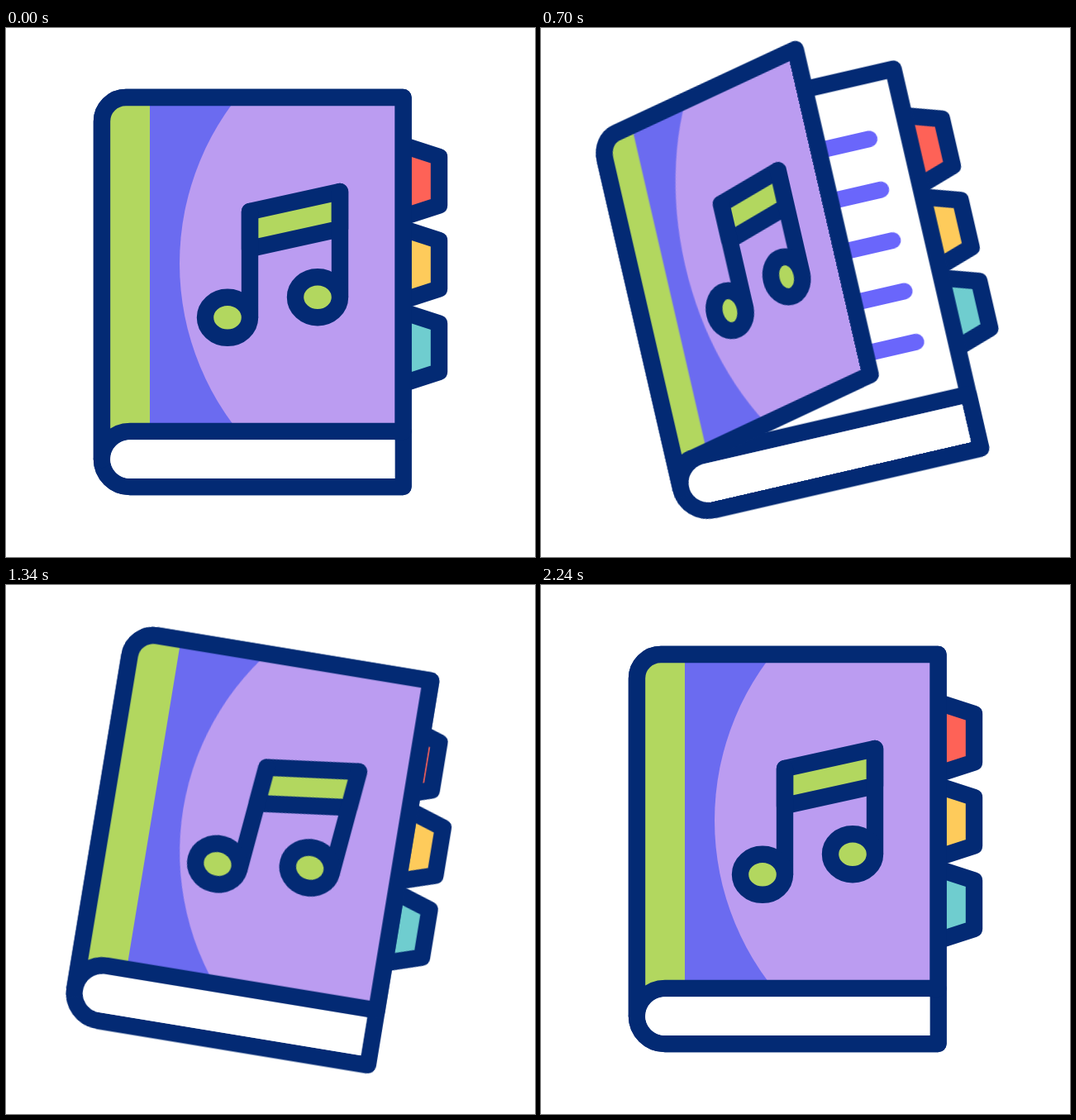
Recreate the animation shown at these times as an HTML page without scripts. Size 640 px wide and 640 px high, loop 2400 ms.

```html
<!DOCTYPE html>
<html lang="en">
<head>
<meta charset="utf-8">
<title>Music book</title>
<style>
  html, body { margin: 0; width: 100%; height: 100%; overflow: hidden; background: #fff; }
  svg { display: block; width: 100%; height: 100%; }

  .ink { stroke: #032a74; stroke-width: 20.4; stroke-linecap: round; stroke-linejoin: round; }
  .ink * { vector-effect: non-scaling-stroke; }

  .book, .lid, .face, .note, .tab {
    animation: 2.4s cubic-bezier(.333, 0, .667, 1) infinite;
  }
  .book { animation-name: sway; transform-origin: 302px 305px; }
  .lid { animation-name: open; }
  .face { animation-name: squeeze; transform-origin: 116px 0; }
  .note { animation-name: swing; transform-origin: 322px 286px; }
  .tab { animation-name: tuck; }
  .second { animation-delay: .2s; }
  .third { animation-delay: .4s; }

  @keyframes sway {
    0%, 8.333% { transform: rotate(0deg); }
    33.333% { transform: rotate(-14deg); }
    58.333% { transform: rotate(10deg); }
    75% { transform: rotate(-7deg); }
    91.667%, 100% { transform: rotate(0deg); }
  }
  @keyframes open {
    0%, 8.333%, 50%, 100% {
      d: path("M116 522C116 503 131 488 150 488L480.5 488L480.5 84L145 84C129 84 116 97 116 113Z");
    }
    37.5% {
      d: path("M116 522C116 503 125 488 137 488L343.5 426L343.5 22L134 84C124 87 116 97 116 113Z");
    }
  }
  @keyframes squeeze {
    0%, 8.333%, 50%, 100% { transform: translateY(0) scaleX(1); }
    37.5% { transform: translateY(-32px) scaleX(.624); }
  }
  @keyframes swing {
    0%, 50% { transform: rotate(0deg); }
    66.667% { transform: rotate(20deg); }
    79.167% { transform: rotate(-10deg); }
    91.667%, 100% { transform: rotate(0deg); }
  }
  @keyframes tuck {
    0%, 50% { transform: translateX(0); }
    63.889% { transform: translateX(-55px); }
    75%, 100% { transform: translateX(0); }
  }
</style>
</head>
<body>
<svg viewBox="0 0 640 640">
  <defs>
    <clipPath id="cover">
      <path class="lid" d="M116 522C116 503 131 488 150 488L480.5 488L480.5 84L145 84C129 84 116 97 116 113Z"/>
    </clipPath>
    <path id="flag" d="M470 138.5L524 156V214.5L470 232Z"/>
  </defs>

  <g class="book">
    <!-- index tabs -->
    <g class="ink">
      <g class="tab" fill="#fe6257"><use href="#flag"/></g>
      <g class="tab second" fill="#fecb5b"><use href="#flag" y="101"/></g>
      <g class="tab third" fill="#6fcdcf"><use href="#flag" y="201.5"/></g>
    </g>

    <!-- pages -->
    <path class="ink" fill="#fff" d="M480.5 84H145C129 84 116 97 116 113V521.5C116 540 131 555 150 555H480.5Z"/>
    <path stroke="#6a66fb" stroke-width="20" stroke-linecap="round"
      d="M220 160H433M220 223H433M220 286H433M220 349H433M220 412H433"/>
    <path class="ink" fill="#fff" d="M480.5 555H150C131 555 116 540 116 521.5S131 488 150 488H480.5Z"/>

    <!-- cover -->
    <g clip-path="url(#cover)">
      <g class="face">
        <path fill="#6b6bf0" d="M100 0H600V640H100Z"/>
        <path fill="#b2d75f" d="M100 0H174V640H100Z"/>
        <circle cx="535" cy="285" r="325" fill="#bb9cf1"/>
      </g>
    </g>
    <path class="lid ink" fill="none" d="M116 522C116 503 131 488 150 488L480.5 488L480.5 84L145 84C129 84 116 97 116 113Z"/>
    <!-- page block below the cover -->
    <path fill="#fff" d="M470.5 545H150C137 545 126.2 534.5 126.2 521.5S137 498.2 150 498.2H470.5Z"/>

    <g class="face ink" fill="#b2d75f">
      <g class="note">
        <path d="M295 222L404 198V243L295 267Z"/>
        <path fill="none" d="M295 222V350M404 198V325"/>
        <ellipse cx="268" cy="350.3" rx="27" ry="24.5"/>
        <ellipse cx="377" cy="325.7" rx="27" ry="24.5"/>
      </g>
    </g>
  </g>
</svg>
</body>
</html>
```
